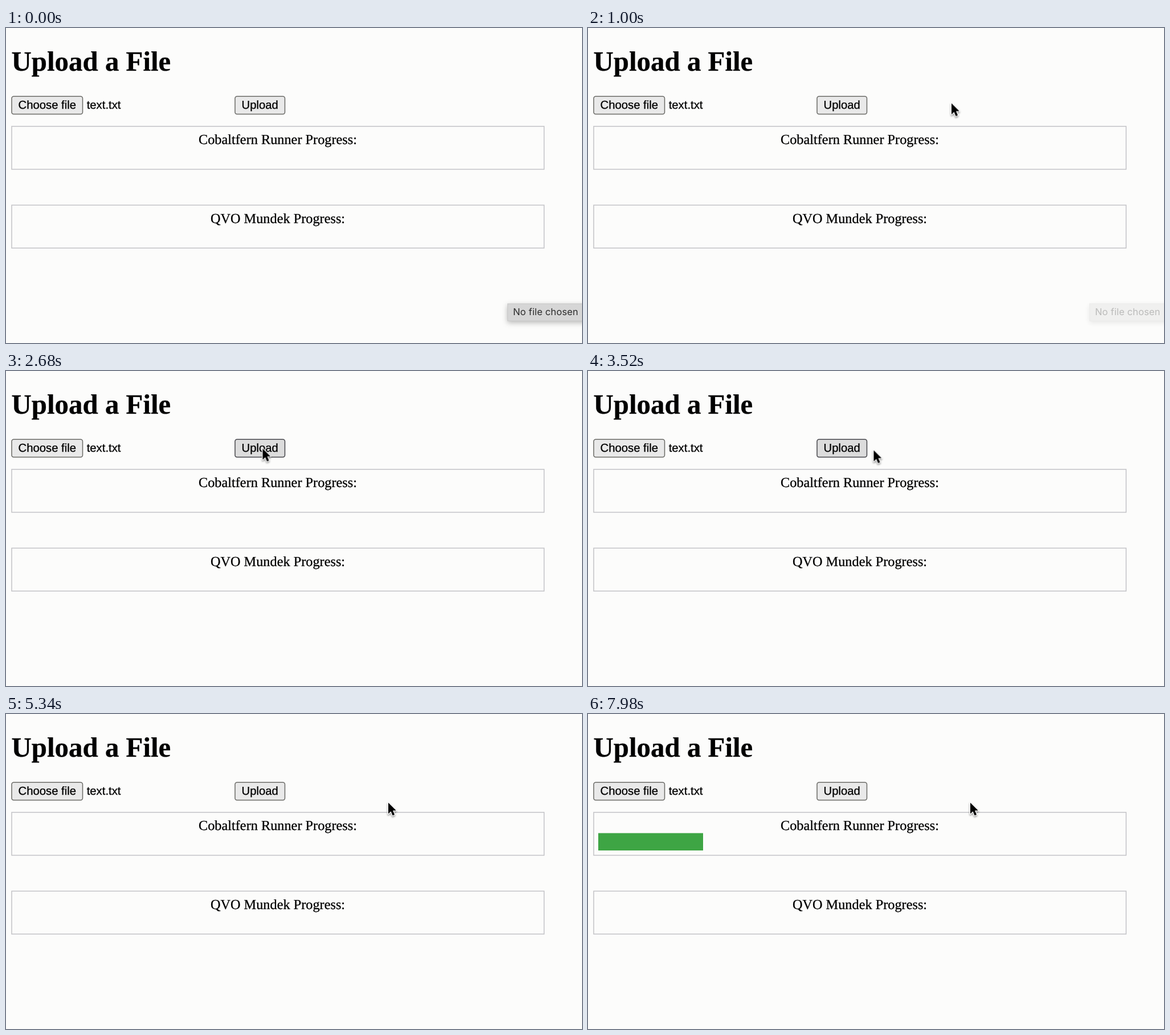
Write an HTML page that moves like this. It is 1011 by 554 pixels and loops after 8000 ms.

```html
<!DOCTYPE html>
<html lang="en">
<head>
<meta charset="utf-8">
<title>Upload a File</title>
<style>
  html, body { margin: 0; width: 100%; height: 100%; overflow: hidden; background: #fcfcfb; }
  svg { display: block; width: 1011px; height: 554px; }

  text { text-rendering: geometricPrecision; }
  .serif, .title, .sans { stroke: #000; stroke-width: .3; }
  .serif { font: 24.3px "Liberation Serif", "Times New Roman", serif; text-anchor: middle; }
  .title { font: bold 48.9px "Liberation Serif", "Times New Roman", serif; }
  .sans { font: 20.3px "Liberation Sans", Arial, sans-serif; }
  .tip text { font: 16.6px Inter, sans-serif; letter-spacing: .1px; fill: #2e2e2e; }

  .panel { fill: none; stroke: #c2c2c6; stroke-width: 1.5; }
  .button { fill: #e9e9e9; stroke: #6a6a66; stroke-width: 1.5; }
  .bar { fill: #3ea544; }
  .tip rect { fill: #d6d6d6; stroke: #c8c8c8; filter: drop-shadow(0 3px 5px #0004); }
  .cursor path {
    stroke: #fff; stroke-width: 2.6; stroke-linejoin: round; paint-order: stroke;
    filter: drop-shadow(0 2px 1.5px #0006);
  }

  .tip, .hover, .bar, .cursor { animation: 8s linear infinite; }
  .tip { animation-name: fade; }
  .hover { animation-name: hover; animation-timing-function: step-end; }
  .bar { animation-name: grow; animation-timing-function: step-end; }
  .cursor { animation-name: move; }

  @keyframes fade {
    0%, 5% { opacity: 1; }
    16%, 100% { opacity: 0; }
  }
  @keyframes hover {
    0%, 45.5%, 100% { fill: #e9e9e9; stroke: #6a6a66; }
    20.75% { fill: #dcdcdc; stroke: #45454a; }
  }
  @keyframes grow {
    0%, 100% { width: 0; }
    70.75% { width: 92px; }
    89.25% { width: 184px; }
  }
  @keyframes move {
    0%, 5.99% { transform: translate(870px, 465px); opacity: 0; }
    6% { transform: translate(870px, 465px); opacity: 1; animation-timing-function: ease-in-out; }
    12.5%, 13.75% { transform: translate(638px, 132.5px); animation-timing-function: ease-out; }
    19.5%, 20.74% { transform: translate(495px, 137px); }
    20.75% { transform: translate(460px, 136.5px); }
    21%, 42.25% { transform: translate(450.5px, 136.5px); }
    44%, 45.25% { transform: translate(501.5px, 139.5px); animation-timing-function: ease-out; }
    52.25%, 100% { transform: translate(671px, 156px); opacity: 1; }
  }
</style>
</head>
<body>
<svg viewBox="0 0 1011 554">
  <text class="title" x="9.5" y="75">Upload a File</text>

  <rect class="button" x="10" y="120.3" width="124.5" height="31.2" rx="3.5"/>
  <text class="sans" x="21.5" y="142">Choose file</text>
  <text class="sans" x="141.7" y="142">text.txt</text>
  <rect class="button hover" x="402" y="120.3" width="87.5" height="31.2" rx="3.5"/>
  <text class="sans" x="413.5" y="142">Upload</text>

  <rect class="panel" x="10" y="173" width="934.5" height="75.5"/>
  <text class="serif" x="477" y="204">Cobaltfern Runner Progress:</text>
  <rect class="bar" x="18" y="209.5" width="0" height="30.5"/>

  <rect class="panel" x="10" y="311.5" width="934.5" height="75.5"/>
  <text class="serif" x="477" y="342.5">QVO Mundek Progress:</text>

  <g class="tip">
    <rect x="880.5" y="485" width="140" height="30"/>
    <text x="890" y="505">No file chosen</text>
  </g>

  <g class="cursor">
    <path d="M0 0V19.5L4.6 15.2 7.6 22.4 11.1 20.9 8 13.8H13.8Z"/>
  </g>
</svg>
</body>
</html>
```
